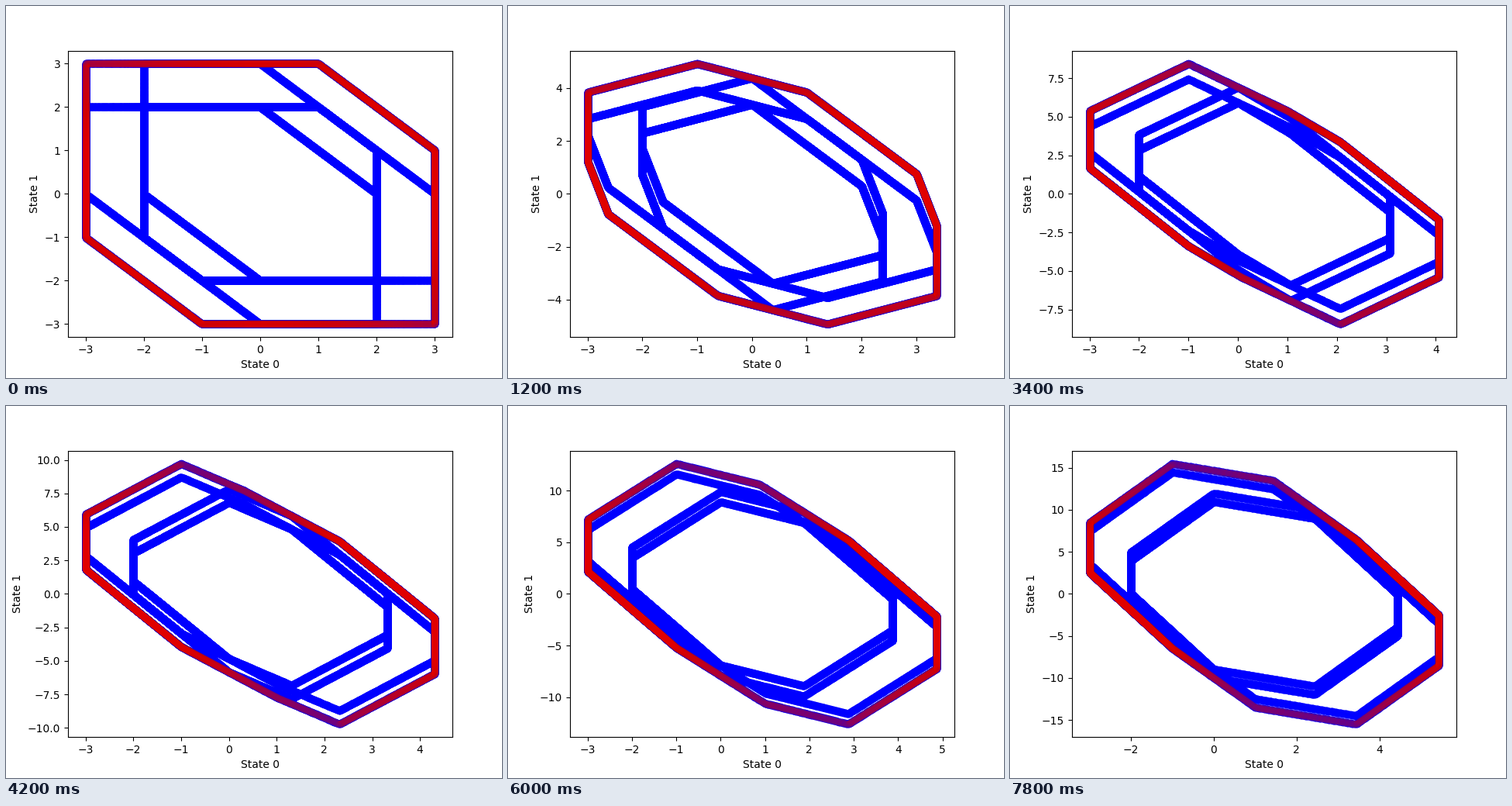
A matplotlib script that plays this animation: 640x480 px, repeating every 8 s.

```python
import numpy as np
import matplotlib.pyplot as plt
from matplotlib.animation import FuncAnimation

FRAMES = 40
STEP_MS = 200

fig, ax = plt.subplots(figsize=(6.4, 4.8), dpi=100)


def boundary(center, gens, count):
    """Points where evenly spaced rays from the center leave a zonotope."""
    gens = np.array([g for g in gens if np.hypot(*g) > 0])
    normals = np.column_stack([-gens[:, 1], gens[:, 0]])
    support = np.abs(gens @ normals.T).sum(axis=0)
    angle = np.linspace(0, 2 * np.pi, count)
    rays = np.array([np.cos(angle), np.sin(angle)])
    reach = (support[:, None] / (np.abs(normals @ rays) + 1e-12)).min(axis=0)
    return center[:, None] + reach * rays


def draw(k):
    ax.clear()
    slope = 0.09 * k
    drift = k / 32
    center = np.array([drift, 0.0])
    core = [(1, slope), (1, -1 - slope), (drift, -1), (0, 0.05 * k)]
    side = [(1, -slope)]
    lift = [(0, 1)]
    full = core + side + lift

    for gens in (core, core + side, core + lift, full):
        ax.scatter(*boundary(center, gens, 5000), color="blue")
    ax.scatter(*boundary(center, full, 10000), color="red", alpha=0.03)

    ax.set_xlabel("State 0")
    ax.set_ylabel("State 1")


anim = FuncAnimation(fig, draw, frames=FRAMES, init_func=lambda: None,
                     interval=STEP_MS, repeat=True, repeat_delay=0)
plt.show()
```
